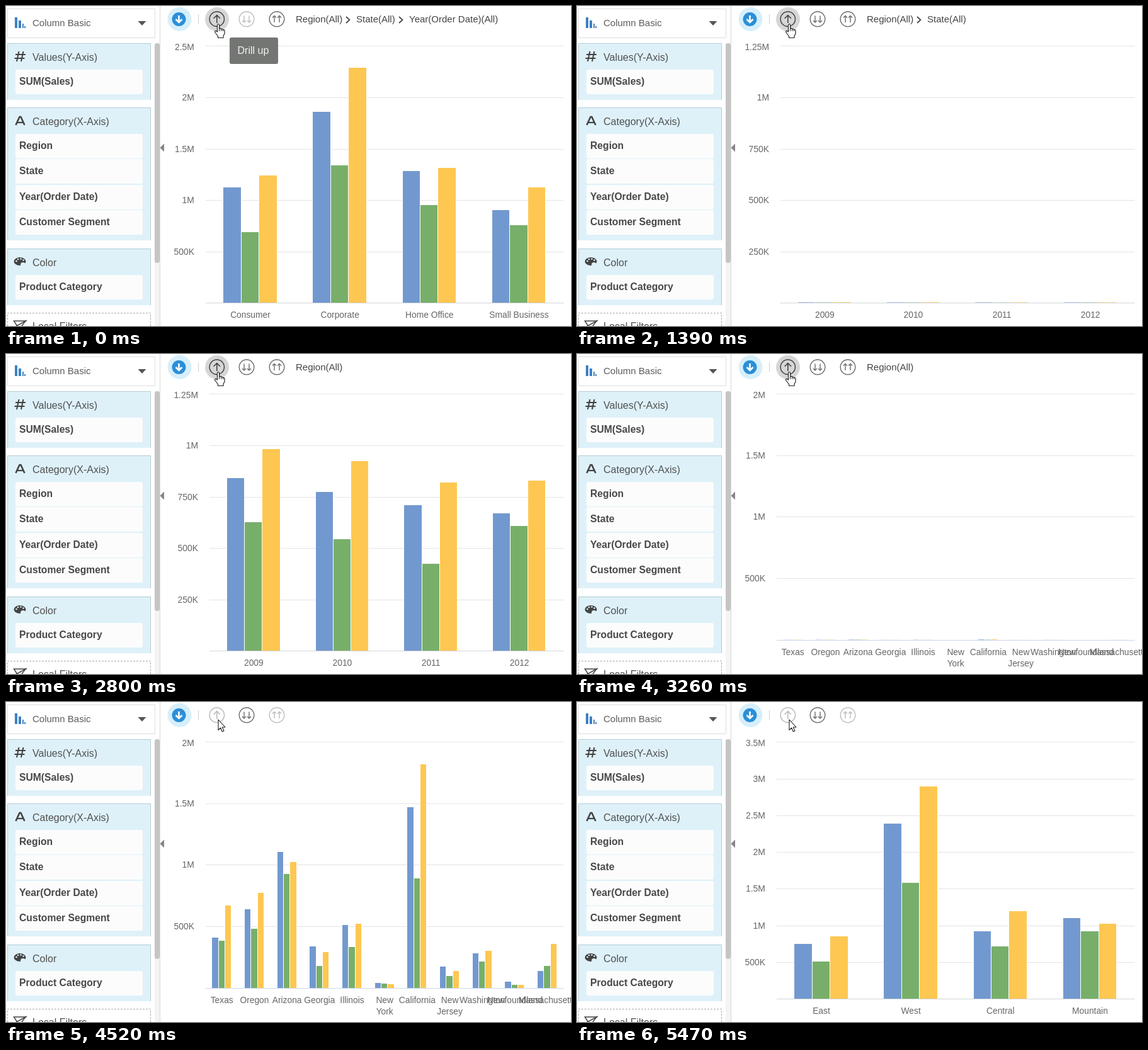
Animation, 897 px wide and 508 px high, one loop 5940 ms. Source, as an HTML page with a canvas:

```html
<!DOCTYPE html>
<html lang="en">
<head>
<meta charset="utf-8">
<title>Drill up</title>
<style>
html, body { margin: 0; width: 100%; height: 100%; overflow: hidden; background: #fff; }
canvas { display: block; }
</style>
</head>
<body>
<canvas id="stage" width="897" height="508"></canvas>
<script>
const ctx = document.getElementById('stage').getContext('2d');
const LOOP = 5940;
const SANS = '"Liberation Sans", Arial, sans-serif';
const SERIES = ['#7299cf', '#77af6a', '#fec752'];
const RIGHT = 885.5;

// Each group: label followed by the top edge of its three bars.
const CHARTS = [
  { start: -1000, x: 316.9, base: 471.3, ticks: ['2.5M', '2M', '1.5M', '1M', '500K'], groups: [
    ['Consumer', 288, 359, 269], ['Corporate', 168, 253, 98],
    ['Home Office', 262, 316, 257], ['Small Business', 324, 348, 288]] },
  { start: 1390, x: 323, base: 471.3, ticks: ['1.25M', '1M', '750K', '500K', '250K'], groups: [
    ['2009', 197, 267, 151], ['2010', 219, 294, 170],
    ['2011', 240, 333, 204], ['2012', 253, 273, 201]] },
  { start: 3260, x: 316.9, base: 453.6, ticks: ['2M', '1.5M', '1M', '500K'], groups: [
    ['Texas', 374, 379, 323], ['Oregon', 329, 360, 303], ['Arizona', 238, 273, 254],
    ['Georgia', 388, 419, 397], ['Illinois', 354, 389, 352], ['New York', 446, 447, 448],
    ['California', 167, 280, 99], ['New Jersey', 420, 435, 427], ['Washington', 399, 412, 395],
    ['Newfoundland', 444, 449, 449], ['Massachusetts', 427, 419, 384]] },
  { start: 4990, x: 316.9, base: 471.3, ticks: ['3.5M', '3M', '2.5M', '2M', '1.5M', '1M', '500K'], groups: [
    ['East', 384, 412, 372], ['West', 193, 287, 134],
    ['Central', 364, 388, 332], ['Mountain', 343, 364, 352]] }
];

function rect(x, y, w, h, fill) {
  ctx.fillStyle = fill;
  ctx.fillRect(x, y, w, h);
}

function roundRect(x, y, w, h, r, fill) {
  ctx.beginPath();
  ctx.roundRect(x, y, w, h, r);
  ctx.fillStyle = fill;
  ctx.fill();
}

function text(str, x, y, size, color, align = 'left', weight = '') {
  ctx.font = `${weight} ${size}px ${SANS}`;
  ctx.textAlign = align;
  ctx.fillStyle = color;
  ctx.fillText(str, x, y);
}

function trace(points, closed) {
  ctx.beginPath();
  points.forEach(([x, y]) => ctx.lineTo(x, y));
  if (closed) ctx.closePath();
}

function polygon(points, fill) {
  trace(points, true);
  ctx.fillStyle = fill;
  ctx.fill();
}

function line(points, color, width) {
  trace(points);
  ctx.strokeStyle = color;
  ctx.lineWidth = width;
  ctx.stroke();
}

function circle(x, y, r, fill) {
  ctx.beginPath();
  ctx.arc(x, y, r, 0, 7);
  ctx.fillStyle = fill;
  ctx.fill();
}

function ring(x, y, r, color, width) {
  ctx.beginPath();
  ctx.arc(x, y, r, 0, 7);
  ctx.strokeStyle = color;
  ctx.lineWidth = width;
  ctx.stroke();
}

// dir is -1 for up and 1 for down
function arrow(x, y, dir, half, head, color, width) {
  const tip = y + dir * half;
  line([[x, y - dir * half], [x, tip]], color, width);
  line([[x - head, tip - dir * head], [x, tip], [x + head, tip - dir * head]], color, width);
}

function panel(y, h, title, items) {
  rect(2, y, 228, h, '#def1f9');
  line([[2.5, y + h], [2.5, y + .5], [229.5, y + .5], [229.5, y + h]], '#b5cbd3', 1);
  text(title, 42, y + 28, 16, '#505050');
  items.forEach((item, i) => {
    const top = y + 42 + i * 40.3;
    roundRect(15, Math.round(top), 202, 39, 3, '#fcfcfc');
    text(item, 21, Math.round(top) + 24, 15.7, '#484848', 'left', 'bold');
  });
}

function sidebar() {
  rect(236, 59, 8, 449, '#f4f4f4');
  rect(244, 0, 1, 508, '#d9d9d9');
  roundRect(236, 59, 8, 349, 4, '#c5c5c5');
  polygon([[251, 218.5], [244.5, 225], [251, 231.5]], '#858585');

  ctx.strokeStyle = '#dedede';
  ctx.lineWidth = 1;
  ctx.strokeRect(2.5, 4.5, 234, 46);
  rect(14, 18, 4, 17, '#3d82c4');
  rect(20, 23, 4, 12, '#3d82c4');
  rect(26, 28, 2, 7, '#3d82c4');
  rect(29, 32, 2, 3, '#3d82c4');
  text('Column Basic', 42, 32, 15, '#5c5c5c');
  polygon([[209.5, 24], [222.5, 24], [216, 31]], '#555');

  panel(59, 90, 'Values(Y-Axis)', ['SUM(Sales)']);
  panel(161, 211, 'Category(X-Axis)', ['Region', 'State', 'Year(Order Date)', 'Customer Segment']);
  panel(385, 90, 'Color', ['Product Category']);

  const ink = '#434343';
  line([[20.5, 72], [17, 88]], ink, 2);
  line([[27.5, 72], [24, 88]], ink, 2);
  line([[15, 77], [31, 77]], ink, 2);
  line([[13.5, 83], [29.5, 83]], ink, 2);

  line([[15.5, 189], [21.5, 176], [23.5, 176], [29.5, 189]], ink, 2.6);
  line([[18, 185], [27, 185]], ink, 2.2);

  ctx.beginPath();
  ctx.ellipse(22, 405.5, 9.5, 6.5, 0, 0, 7);
  ctx.fillStyle = ink;
  ctx.fill();
  [[16.5, 405], [19, 402], [23.5, 401.5], [27.5, 403.5]].forEach(([x, y]) => circle(x, y, 1.3, '#def1f9'));
  circle(27, 411, 4, '#def1f9');

  ctx.setLineDash([3, 2]);
  line([[2.5, 508], [2.5, 487.5], [229.5, 487.5], [229.5, 508]], '#a8a8a8', 1);
  ctx.setLineDash([]);
  line([[19, 510], [12.5, 500], [31, 500], [25, 508]], ink, 1.5);
  line([[13, 510], [33, 499]], ink, 1.5);
  text('Local Filters', 42, 514, 16, '#505050');
}

function drawChart({ start, x, base, ticks, groups }, t) {
  const step = Math.floor((t - start + 10) / 80);
  const grow = .5 - .5 * Math.cos(Math.PI * Math.min(1, (step * 80 + 15) / 500));
  const bottom = Math.round(base);
  const span = (base - 63.3) / ticks.length;
  const groupWidth = (RIGHT - x) / groups.length;
  const barWidth = groupWidth / 5;

  ticks.forEach((label, i) => {
    const y = Math.round(63.3 + i * span);
    rect(x, y, RIGHT - x, 1, '#e4e4e4');
    text(label, x - 18, y + (i ? 5 : 7), 13.9, '#666', 'right');
  });

  groups.forEach(([label, ...tops], g) => {
    const left = x + g * groupWidth;
    tops.forEach((top, s) => {
      const a = Math.round(left + barWidth * (s + 1));
      const b = Math.round(left + barWidth * (s + 2)) - 1;
      const h = (bottom - top) * grow;
      rect(a - 1, bottom - h - 1, b - a + 2, h + 1, '#fff');
      rect(a, bottom - h, b - a, h, SERIES[s]);
    });
    const lines = groups.length > 4 ? label.split(' ') : [label];
    lines.forEach((word, i) =>
      text(word, left + groupWidth / 2, bottom + 24 + i * 18, 13.8, '#666', 'center'));
  });
  rect(x, bottom, RIGHT - x, 1, groups.length > 4 ? '#ccd6eb' : '#d3d6dc');
}

// Level from 0 to 1 held from each [time, level] pair to the next
function held(t, steps) {
  return steps.reduce((value, [at, level]) => t >= at ? level : value, 1);
}

function grey(level) {
  const v = Math.round(185 - 120 * level);
  return `rgb(${v},${v},${v})`;
}

function toolbar(t) {
  const hover = held(t, [[540, .6], [620, 1], [2570, .6], [2650, .75], [2720, .9], [2800, 1],
    [4200, .6], [4280, .25], [4360, 0]]);
  const upLevel = held(t, [[540, .7], [770, 1], [2570, .7], [2800, 1], [4200, .5], [4360, .1], [4520, 0]]);

  circle(275.5, 21, 19, '#d7effb');
  circle(274.5, 21, 11, '#2c8fd6');
  arrow(274.5, 20.5, 1, 5.5, 5, '#fff', 2.6);
  rect(305, 13, 1, 16, '#cfcfcf');

  circle(335, 21, 19, `rgba(214,214,214,${hover})`);
  ring(334.8, 20.8, 11.7, grey(upLevel), 1.5);
  arrow(334.8, 20.8, -1, 6.2, 5.2, grey(upLevel), 1.6);

  [[382, 1, t >= 540], [430, -1, t < 4200]].forEach(([x, dir, enabled]) => {
    const color = enabled ? '#6a6a6a' : '#bcbcbc';
    ring(x, 20.8, 11.8, color, 1.4);
    [-4, 4].forEach(dx => arrow(x + dx, 20.8, dir, 5.3, 3, color, 1.4));
  });

  const count = t < 540 ? 3 : t < 2570 ? 2 : t < 4200 ? 1 : 0;
  [['Region(All)', 460], ['State(All)', 556], ['Year(Order Date)(All)', 640]].slice(0, count)
    .forEach(([label, x], i) => {
      if (i) line([[x - 16, 17], [x - 10.5, 22], [x - 16, 27]], '#444', 1.7);
      text(label, x, 26, 15, '#444');
    });

  if (t < 770) {
    roundRect(355, 50, 77, 42, 3, '#747673');
    text('Drill up', 367.5, 76, 16, '#f2f2f2');
  }
}

function cursor(t) {
  ctx.save();
  ctx.lineJoin = 'round';
  if (t >= 4280) {
    const shape = [[337, 28], [337, 44.5], [340.7, 41], [343.2, 47], [346, 45.8], [343.4, 40], [348, 40]];
    polygon(shape, '#fff');
    ctx.closePath();
    ctx.strokeStyle = '#222';
    ctx.lineWidth = 1.1;
    ctx.stroke();
  } else {
    ctx.beginPath();
    ctx.moveTo(335.5, 41);
    ctx.lineTo(335.5, 30);
    ctx.quadraticCurveTo(337, 27, 338.6, 30);
    ctx.lineTo(338.6, 36);
    ctx.quadraticCurveTo(340.5, 34.5, 341.6, 36.8);
    ctx.quadraticCurveTo(343.5, 35.6, 344.4, 37.8);
    ctx.quadraticCurveTo(347, 36.8, 347, 39.5);
    ctx.lineTo(347, 44);
    ctx.lineTo(345, 47.5);
    ctx.lineTo(345, 50.5);
    ctx.lineTo(336.5, 50.5);
    ctx.lineTo(336.5, 48);
    ctx.lineTo(331.6, 41.5);
    ctx.quadraticCurveTo(331.5, 38.5, 334, 39.7);
    ctx.closePath();
    ctx.fillStyle = '#fff';
    ctx.fill();
    ctx.strokeStyle = '#222';
    ctx.lineWidth = 1.2;
    ctx.stroke();
    [338.6, 341.6, 344.4].forEach((x, i) => line([[x, 36 + i * .8], [x, 40]], '#222', 1));
  }
  ctx.restore();
}

function draw(now) {
  const t = now % LOOP;
  rect(0, 0, 897, 508, '#fff');
  sidebar();
  drawChart(CHARTS.filter(chart => t >= chart.start).pop(), t);
  toolbar(t);
  cursor(t);
  requestAnimationFrame(draw);
}

draw(0);
</script>
</body>
</html>
```
